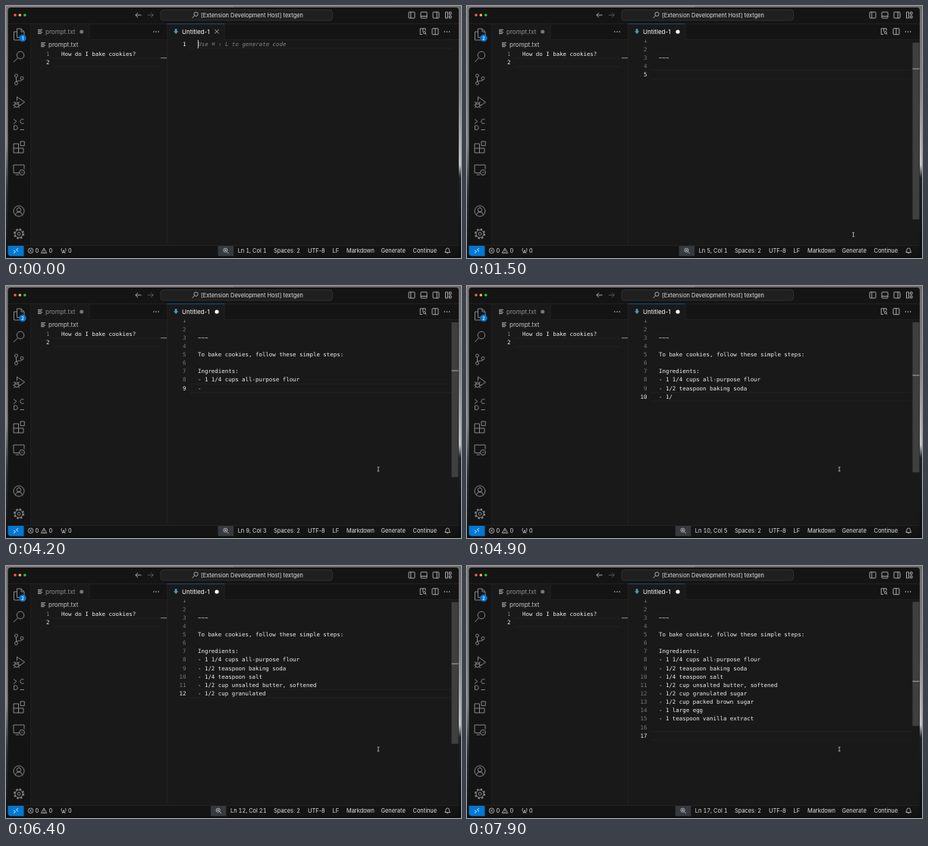
Animation of 600 by 333 pixels, one loop 8000 ms. Source, as an HTML page:

```html
<!DOCTYPE html>
<html lang="en">
<head>
<meta charset="utf-8">
<title>Editor</title>
<style>
html, body { margin: 0; width: 100%; height: 100%; overflow: hidden; background: #0c0d0f; }
svg { display: block; width: 600px; height: 333px; }
text { font: 7.43px Inter, "Open Sans", sans-serif; fill: #e2e2e2; white-space: pre; }
.tab { font-size: 8.05px; }
.code text { font: 7.43px "DejaVu Sans Mono", "Liberation Mono", monospace; fill: #f0f0f0; }
.num text { fill: #737a82; text-anchor: end; }
.num .on { fill: #f0f0f0; }
#place { font-variant-numeric: tabular-nums; }
.line { fill: none; stroke: #ccc; stroke-width: .8; }
.bar { fill: none; stroke: #868686; stroke-width: 1; }
.edge { fill: none; stroke: #262626; stroke-width: .7; }
</style>
</head>
<body>
<svg viewBox="0 0 600 333">
  <defs>
    <linearGradient id="west" x2="0" y2="1">
      <stop offset="0" stop-color="#777"/><stop offset=".55" stop-color="#858585"/>
      <stop offset=".74" stop-color="#2a3038"/><stop offset="1" stop-color="#0c0d0f"/>
    </linearGradient>
    <linearGradient id="east" x2="0" y2="1">
      <stop offset="0" stop-color="#6a6a6a"/><stop offset=".35" stop-color="#858585"/>
      <stop offset=".63" stop-color="#c4c4c4"/><stop offset=".68" stop-color="#1c242e"/>
      <stop offset="1" stop-color="#0c0d0f"/>
    </linearGradient>
    <clipPath id="pane"><path d="M212 44.7H597V316.5H212Z"/></clipPath>
    <path id="lines" d="M-3-2.4H3M-3-.7H1.5M-3 1H3M-3 2.7H1.5"/>
    <g id="dots" fill="#ccc"><circle cx="-3.2" r=".75"/><circle r=".75"/><circle cx="3.2" r=".75"/></g>
    <rect id="box" x="-4" y="-4" width="8" height="8" rx=".8"/>
  </defs>

  <!-- window -->
  <path d="M0 0H300V333H0Z" fill="url(#west)"/>
  <path d="M300 0H600V333H300Z" fill="url(#east)"/>
  <rect x="2.5" y="2" width="594.5" height="328.5" rx="4" fill="#141414"/>
  <path d="M32.5 44.5H212V316.5H32.5ZM212 44.5H597V316.5H212ZM32.5 23.5H110V45H32.5ZM212 23.5H288V45H212Z" fill="#191919"/>
  <path class="edge" d="M2.5 23.5H597M32.5 23.5V316.5M212.3 23.5V316.5M2.5 316.5H597M110 23.5V44.5H212M288 23.5V44.5H597"/>
  <path d="M212.5 23.7H288" stroke="#0a68b4" stroke-width=".7"/>

  <!-- title bar -->
  <circle cx="12" cy="12" r="1.8" fill="#ff5f57"/>
  <circle cx="18.3" cy="12" r="1.8" fill="#febc2e"/>
  <circle cx="24.8" cy="12" r="1.8" fill="#28c840"/>
  <path class="line" d="M178.5 12H170.8M174 8.8L170.8 12L174 15.2"/>
  <path class="line" opacity=".45" d="M186.5 12H194.2M191 8.8L194.2 12L191 15.2"/>
  <rect x="204" y="5" width="226.5" height="14" rx="3.5" fill="#1f1f1f" stroke="#3c3c3c" stroke-width=".7"/>
  <g class="line"><circle cx="250.5" cy="10.8" r="2.6"/><path d="M248.6 12.7L245.5 16"/></g>
  <text x="257" y="14.5">[Extension Development Host] textgen</text>
  <g class="line">
    <g transform="translate(535 12)"><use href="#box"/><path d="M-1.2-4V4"/></g>
    <g transform="translate(551 12)"><use href="#box"/><path d="M-4 1.5H4"/></g>
    <g transform="translate(567 12)"><use href="#box"/><path d="M1.2-4V4"/></g>
    <path d="M579.5 8H582.5V16H579.5ZM584.5 8H587V11H584.5ZM584.5 13H587V16H584.5Z"/>
  </g>

  <!-- activity bar -->
  <g class="bar">
    <path transform="translate(17 37.5)" d="M-2.5-7.5H3L7-3.5V4H-2.5ZM3-7.5V-3.5H7M-2.5-3.5H-6.5V7.5H3V4"/>
    <g transform="translate(17 67)"><circle cx="2" cy="-2" r="4.8"/><path d="M-1.4 1.4L-7 7.3"/></g>
    <g transform="translate(17 97)"><circle cx="-3.5" cy="-5" r="2"/><circle cx="-3.5" cy="5.2" r="2"/><circle cx="4" cy="-1.5" r="2"/><path d="M-3.5-3V3.2M4 .5C4 3-3.5 1-3.5 3.2"/></g>
    <g transform="translate(17 127)"><path d="M-2.5-2V-7L7.5 0L.5 5"/><ellipse cx="-3" cy="3.5" rx="2.5" ry="3.5"/><path d="M-5.5 2.5H-.5M-5.5 4H-8M-.5 4H2M-5 1L-7-.5M-1 1L1-.5M-5 6L-7 7.5M-1 6L1 7.5"/></g>
    <path transform="translate(17 156)" d="M-7-6.5L-3-3.5L-7-.5M6.5-6Q2-7.5 1.8-3.5Q2 .5 6.5-1M-6.5 2V7.5Q-1.5 8-1.7 4.7Q-1.7 1.7-6.5 2M1.5 7.5H7"/>
    <path transform="translate(17 186)" d="M-7-4H-.5V2H6V8H-7ZM-7 2H-.5V8M2-7H7.3V-1.5H2Z"/>
    <g transform="translate(17 216)"><path d="M0 4.5H-7V-6H7V-.5M-4.5 7H0"/><circle cx="4" cy="4" r="3.5"/><path d="M2.5 3L3.6 4L2.5 5M5.6 3L4.5 4L5.6 5" stroke-width=".7"/></g>
    <g transform="translate(17 271)"><circle r="7"/><circle cy="-1.7" r="2.7"/><path d="M-4.6 5.2Q-4 1.2 0 1.2T4.6 5.2"/></g>
    <g transform="translate(17 301)"><circle r="2"/><circle r="5"/><circle r="6.1" stroke-width="2" stroke-dasharray="2.4 2.39"/></g>
  </g>
  <circle cx="22" cy="42.5" r="4.7" fill="#0078d4"/>
  <text id="badge" x="22" y="44.6" text-anchor="middle" style="font-size:5.6px;font-weight:600;fill:#fff"></text>

  <!-- left editor -->
  <g class="line">
    <use href="#lines" x="45" y="33.8"/><use href="#lines" x="49" y="51"/>
  </g>
  <text class="tab" x="52" y="36.8" style="fill:#8c8c8c">prompt.txt</text>
  <circle cx="99.7" cy="34" r="2.5" fill="#777"/>
  <use href="#dots" x="198" y="34"/>
  <text class="tab" x="56" y="53.8" style="fill:#c4c4c4">prompt.txt</text>
  <path class="edge" d="M62 69.2H204M62 80.2H204"/>
  <path d="M204 68.7H212" stroke="#8f8f8f"/>
  <g class="code">
    <g class="num"><text x="57.5" y="66.3">1</text><text class="on" x="57.5" y="77.4">2</text></g>
    <text x="73" y="66.3">How do I bake cookies?</text>
  </g>

  <!-- right editor -->
  <path d="M222.8 30.3H225.4V33.2H227.2L224.1 36.9L221 33.2H222.8Z" fill="#519aba"/>
  <text class="tab" x="232" y="36.8" style="fill:#fff">Untitled-1</text>
  <path id="close" class="line" d="M275.3 31L280.7 36.4M280.7 31L275.3 36.4"/>
  <circle id="dirty" cx="278" cy="34" r="2.6" fill="#fff"/>
  <g class="line">
    <path d="M549 37.5H546.2V29.8H553.2V32.5M549.8 29.8V34"/><circle cx="551.8" cy="35.2" r="1.5"/><path d="M552.9 36.3L554.3 37.7"/>
    <g transform="translate(566 33.7)"><use href="#box"/><path d="M0-4V4"/></g>
  </g>
  <use href="#dots" x="581.5" y="34"/>
  <g clip-path="url(#pane)">
    <path id="current" class="edge" d="M242 0H587.5M242 11.15H587.5"/>
    <rect id="slider" x="587.5" width="9" fill="#797979" fill-opacity=".4"/>
    <rect id="mark" x="587.5" width="9" height="1.2" fill="#9a9a9a"/>
    <g id="page" class="code"><g id="nums" class="num"></g><g id="body"></g></g>
    <g id="hint" class="code"><text x="253.3" y="52.6" style="fill:#858585;font-style:italic">Use ⌘ ⇧ L to generate code</text></g>
    <path id="caret" d="M253.4 44.9V56" stroke="#ccc"/>
  </g>

  <!-- status bar -->
  <path d="M2.5 317H23.5V330.5H6.5Q2.5 330.5 2.5 326.5Z" fill="#0078d4"/>
  <path class="line" style="stroke:#fff" d="M10 322.7L12.5 324.7L10 326.7M16 320.2L13.5 322.2L16 324.2"/>
  <g class="line">
    <circle cx="32.5" cy="323.3" r="3.3"/><path d="M31.2 322L33.8 324.6M33.8 322L31.2 324.6"/>
    <path d="M50 320L53.6 326.4H46.4ZM50 322.4V324.4M50 325V325.7"/>
    <path d="M74 327L76 322.5L78 327M74.8 325.5H77.2M73.7 320Q72 322.2 73.7 324.4M78.3 320Q80 322.2 78.3 324.4"/>
    <path d="M578.8 325.5Q580 324.5 580 322.3Q580 320 582.3 320T584.6 322.3Q584.6 324.5 585.8 325.5ZM581.3 326.8H583.3"/>
  </g>
  <text x="38.5" y="326">0</text><text x="56.5" y="326">0</text><text x="82" y="326">0</text>
  <text id="place" x="343.5" y="326" text-anchor="end"></text>
  <text x="353" y="326">Spaces: 2</text><text x="398" y="326">UTF-8</text><text x="430.5" y="326">LF</text>
  <text x="449" y="326">Markdown</text><text x="494.5" y="326">Generate</text><text x="536.5" y="326">Continue</text>
  <g id="zoom">
    <path d="M-10.3 317H10.3V330.5H-10.3Z" fill="#36393d"/>
    <g class="line"><circle cx="-.5" cy="322.7" r="2.6"/><path d="M1.4 324.6L3.8 327M-1.8 322.7H.8M-.5 321.4V324"/></g>
  </g>
  <path id="mouse" class="line" d="M-1.4-2.8Q0-2.8 0-2V2Q0 2.8-1.4 2.8M1.4-2.8Q0-2.8 0-2M0 2Q0 2.8 1.4 2.8"/>
</svg>
<script>
const $ = id => document.getElementById(id);
const LOOP = 8000, STEP = 100, START = 1000;
const TOP = 44.7, HEIGHT = 271.8, ROW = 11.15, SCROLL = 4.3;

// "|" parts the pieces in which the answer streams in
const tokens = (
  "To| b|ake| cookies|,| follow| these| simple| steps|:|" +
  "\n|\n|Ing|red|ients|:|\n|-| |1| |1|/|4| c|ups| all|-|pur|pose| fl|our|\n|-| |" +
  "1|/|2| te|as|poon| b|aking| so|da|\n|-| |1|/|" +
  "4| te|as|poon| salt|\n|-| |1|/|2| cup| uns|alt|ed| butter|,| soft|ened|\n|-| |1|/|2| cup| gran|ulated|" +
  " sugar|\n|-| |1|/|2| cup| pack|ed| brown| sugar|\n|-| |1| large| egg|\n|-| |1| te|as|poon| van|illa| extract|\n|\n"
).split("|");
const pace = [[2350, 0], [2900, 10], [4200, 35], [4900, 50], [6400, 78], [7900, tokens.length]];
const mousePath = [[1300, 509.5, 302], [1600, 509.5, 302], [2200, 491, 242]];

// values of column col, interpolated over the times in column 0
function at(keys, t, col = 1) {
  if (t <= keys[0][0]) return keys[0][col];
  for (let i = 1; i < keys.length; i++) {
    const a = keys[i - 1], b = keys[i];
    if (t <= b[0]) return a[col] + (b[col] - a[col]) * (t - a[0]) / (b[0] - a[0]);
  }
  return keys.at(-1)[col];
}

function addText(parent, x, y) {
  const el = document.createElementNS("http://www.w3.org/2000/svg", "text");
  el.setAttribute("x", x);
  el.setAttribute("y", y);
  return parent.appendChild(el);
}

const rows = Array.from({ length: 17 }, (_, i) => {
  const y = TOP + 8 + i * ROW;
  return { num: addText($("nums"), 237.5, y), text: addText($("body"), 253, y) };
});

const show = (id, on) => $(id).style.display = on ? "" : "none";
const move = (id, x, y) => $(id).setAttribute("transform", `translate(${x} ${y})`);

function draw(time) {
  const t = Math.floor(time / STEP) * STEP;
  const begun = t >= START;
  const typed = tokens.slice(0, Math.floor(at(pace, t) + 1e-6)).join("");
  const lines = begun ? ("\n\n~~~\n\n" + typed).split("\n") : [""];
  const last = lines.length - 1;
  const scroll = begun ? SCROLL : 0;
  const scale = HEIGHT / (HEIGHT + last * ROW);

  rows.forEach(({ num, text }, i) => {
    num.textContent = i <= last ? i + 1 : "";
    num.classList.toggle("on", i === last);
    text.textContent = lines[i] || "";
  });
  move("page", 0, -scroll);
  move("current", 0, TOP + last * ROW - scroll);
  $("slider").setAttribute("y", TOP + scroll * scale);
  $("slider").setAttribute("height", HEIGHT * scale);
  $("mark").setAttribute("y", TOP + last * ROW * scale - .6);

  show("slider", begun);
  show("mark", begun);
  show("dirty", begun);
  show("close", !begun);
  show("hint", !begun);
  show("caret", !begun && t < 500);
  $("badge").textContent = begun ? 2 : 1;

  $("place").textContent = `Ln ${last + 1}, Col ${lines[last].length + 1}`;
  move("zoom", 343.5 - $("place").getComputedTextLength() - 15.8, 0);
  show("mouse", t >= mousePath[0][0]);
  move("mouse", at(mousePath, t), at(mousePath, t, 2));
}

function tick() {
  draw(performance.now() % LOOP);
  requestAnimationFrame(tick);
}
tick();
</script>
</body>
</html>
```
